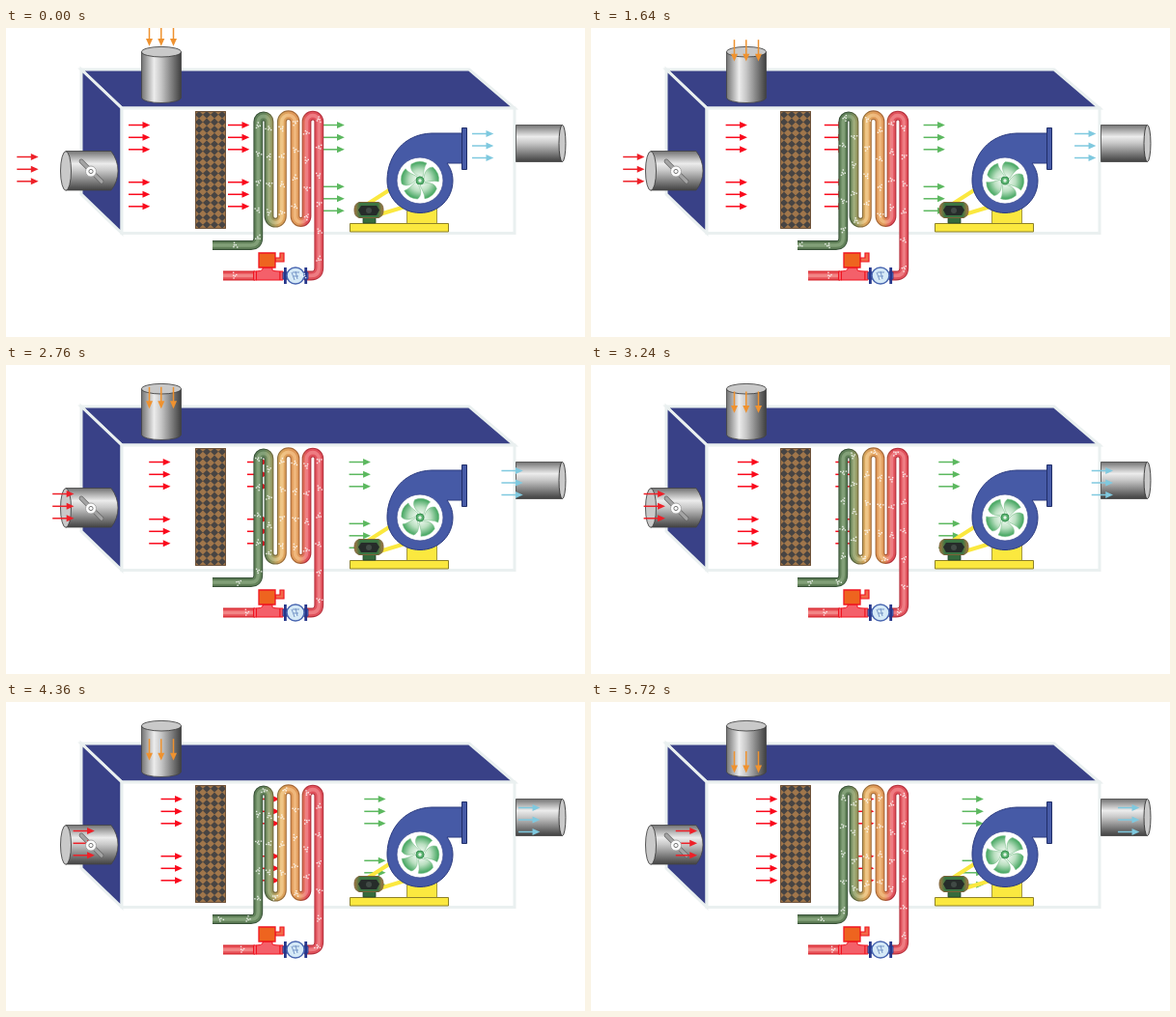
These frames come from a looping animation (600 by 320 pixels, 5760 ms). An HTML page with a canvas:

```html
<!DOCTYPE html>
<html lang="en">
<head>
<meta charset="utf-8">
<title>Air handling unit</title>
<style>
html, body { margin: 0; width: 100%; height: 100%; overflow: hidden; background: #fff; }
canvas { display: block; width: 600px; height: 320px; }
</style>
</head>
<body>
<canvas id="stage" width="600" height="320"></canvas>
<script>
const ctx = document.getElementById('stage').getContext('2d');
const LOOP = 5760, STEP = 40;
const TAU = Math.PI * 2;

const coilShape = 'M214 225H254Q261.3 225 261.3 217V97a5.6 5.6 0 0 1 11.2 0V195' +
  'a6.7 6.7 0 0 0 13.4 0V97a6.8 6.8 0 0 1 13.6 0V195a6 6 0 0 0 12 0V97' +
  'a6.4 6.4 0 0 1 12.8 0V248Q324.3 256.5 316 256.5H309';
const coil = new Path2D(coilShape);
const inlet = new Path2D('M225 256.5H258');

// Points along the flow, sampled once from the pipe outline
const guide = document.createElementNS('http://www.w3.org/2000/svg', 'path');
guide.setAttribute('d', coilShape);
const coilLength = guide.getTotalLength();
const flow = [];
for (let s = 0; s <= coilLength; s++) flow.push(guide.getPointAtLength(coilLength - s));

function paint(path, fill, stroke, width = 1) {
  if (fill) { ctx.fillStyle = fill; ctx.fill(path); }
  if (stroke) { ctx.strokeStyle = stroke; ctx.lineWidth = width; ctx.stroke(path); }
}

function shape(d, fill, stroke, width) {
  paint(new Path2D(d), fill, stroke, width);
}

function box(x, y, w, h, fill, stroke, width) {
  const p = new Path2D();
  p.rect(x, y, w, h);
  paint(p, fill, stroke, width);
}

function oval(x, y, rx, ry, fill, stroke, width) {
  const p = new Path2D();
  p.ellipse(x, y, rx, ry, 0, 0, TAU);
  paint(p, fill, stroke, width);
}

function ramp(x0, y0, x1, y1, ...stops) {
  const g = ctx.createLinearGradient(x0, y0, x1, y1);
  stops.forEach(([at, color]) => g.addColorStop(at, color));
  return g;
}

const metal = (x0, y0, x1, y1) =>
  ramp(x0, y0, x1, y1, [0, '#6e6e6e'], [0.32, '#ececec'], [0.5, '#c6c6c6'], [1, '#3c3c3c']);

function drawHousing() {
  const edge = '#eaf0f0', blue = '#394187';
  shape('M78 43H480L527 83H120Z', blue, edge, 3);
  shape('M78 43L120 83V212.5L78 172Z', blue, edge, 3);
  box(120, 83, 407, 129.5, '#fff', edge, 3);
}

function drawDucts() {
  const cap = '#c9c9c9';
  shape('M140.5 25V72A20.5 5.5 0 0 0 181.5 72V25Z', metal(140, 0, 182, 0), '#444', 0.8);
  oval(161, 24.7, 20.5, 5.3, cap, '#333', 0.8);

  shape('M62 127.5H109Q116 137 116 148Q116 159 109 168H62Z', metal(0, 127, 0, 169), '#444', 0.8);
  oval(62, 148, 5.5, 20.3, cap, '#333', 0.8);

  box(528.5, 100.5, 48, 38, metal(0, 100, 0, 139), '#444', 0.8);
  oval(576.5, 119.5, 3.5, 19, cap, '#222', 0.8);
}

function drawHandle() {
  ctx.lineCap = 'round';
  const bar = new Path2D('M78 138L99 159');
  paint(bar, null, '#666', 4.6);
  paint(bar, null, '#a4a4a4', 3.2);
  ctx.lineCap = 'butt';
}

function drawKnob() {
  oval(88, 148.5, 5.5, 5.5, '#fbfbfb', '#999', 0.8);
  oval(88, 148.5, 2.1, 2.1, '#fff', '#777', 1);
}

function drawFilter() {
  ctx.save();
  ctx.beginPath();
  ctx.rect(196, 86, 32, 122);
  ctx.clip();
  box(196, 86, 32, 122, '#474443');
  const w = 8, h = 7.6;
  for (let i = 0; i <= 4; i++) {
    for (let j = 0; j <= 17; j++) {
      const x = 196 + i * w, y = 86 + j * h;
      shape(`M${x} ${y - h / 2}l${w / 2} ${h / 2}l${-w / 2} ${h / 2}l${-w / 2} ${-h / 2}Z`, '#a0764b');
    }
  }
  ctx.restore();
  box(196.5, 86.5, 31, 121, null, '#6d523a', 1);
}

function tube(path, dark, main, light) {
  paint(path, null, dark, 9.8);
  paint(path, null, main, 7.6);
  paint(path, null, light, 3.6);
}

function coilTint(green, olive, tan, orange, red) {
  return ramp(261, 0, 325, 0, [0, green], [0.1, green], [0.2, olive], [0.36, tan],
    [0.54, orange], [0.66, orange], [0.79, red], [1, red]);
}

function drawPipes() {
  tube(coil,
    coilTint('#395339', '#5d653d', '#99713c', '#a76735', '#b5303c'),
    coilTint('#62825a', '#88945f', '#dca85f', '#e09a5a', '#e0525c'),
    coilTint('#82a078', '#a3ad7a', '#efc888', '#efb77c', '#ee7c82'));
  tube(inlet, '#d8262e', '#e8545a', '#f28686');
}

function drawValves() {
  const red = '#f01420';
  shape('M266 248H276V251Q278 252 284 252V261H259V252Q265 252 266 250Z', '#f4606a', red, 1);
  box(256.5, 252, 3, 9, '#f4606a', red, 1);
  box(284, 252, 3, 9, '#f4606a', red, 1);
  shape('M279 238H284V233H288V242H279Z', '#f26a4a', red, 1.2);
  box(262, 233, 17, 15, '#ee641f', red, 1.3);

  const navy = '#26378b';
  box(287, 253, 26, 7, '#5c78bd', navy, 0.8);
  box(288, 248, 2.8, 17, navy);
  box(309.3, 248, 2.8, 17, navy);
  oval(300, 256.5, 9, 8.5, '#d6eaf7', '#4967b1', 1.5);
  shape('M296 253L299 261M300 252L302 260M297 253H304M298 257H303', null, '#7696c7', 1);
}

function drawSparkles(t) {
  const gap = 29, shift = t / LOOP * gap * 6;
  ctx.fillStyle = 'rgba(255,255,255,.85)';
  const cluster = (x, y, turn) => {
    for (let i = 0; i < 5; i++) {
      const a = turn + i * 2.4, r = 0.6 + i * 0.7;
      ctx.fillRect(x + Math.cos(a) * r - 0.7, y + Math.sin(a) * r - 0.7, 1.4, 1.4);
    }
  };
  for (let s = shift % gap, i = 0; s < coilLength; s += gap, i++) {
    const p = flow[Math.floor(s)];
    cluster(p.x, p.y, (i - Math.floor(shift / gap)) * 1.7);
  }
  cluster(237 + shift % gap * 0.5, 256.5, 1);
}

function drawFan(t) {
  const line = '#8d8128', yellow = '#fbe83f';
  shape('M375 182L400 166M384 194L417 184', null, yellow, 4);
  box(415.5, 184, 31, 19, yellow, line, 0.8);
  box(356.5, 202.5, 102, 8.5, yellow, line, 1);

  box(370, 194, 13, 8, '#366b3d', '#24432a', 0.8);
  shape('M366 180.5H386Q391 182 391 188.5Q391 195 386 196.5H366Q361 195 361 188.5Q361 182 366 180.5Z',
    ramp(361, 0, 391, 0, [0, '#a97943'], [0.2, '#3b7442'], [0.8, '#3b7442'], [1, '#a97943']), '#7a6238', 1);
  shape('M368 184H384L387 188.5L384 194H368L365 188.5Z', '#262c2a');
  oval(376, 189, 3, 3, '#414a46');

  shape('M473 109H441C412 110 396 132 395 156C394 176 410 191.5 429 191.5' +
    'C448 191.5 463 177 463 158C463 150 460 144 457 140H473Z', '#465aa6', '#2c3c80', 1);
  box(472.5, 103.5, 5, 43, '#465aa6', '#202e69', 1);
  oval(429, 158, 24, 24, '#fff', '#3b4c93', 0.8);

  const leaf = ctx.createRadialGradient(0, 0, 3, 0, 0, 21);
  leaf.addColorStop(0, '#f2faf3');
  leaf.addColorStop(0.45, '#b9dfc0');
  leaf.addColorStop(1, '#2c9a4c');
  ctx.save();
  ctx.translate(429, 158);
  ctx.rotate(t / LOOP * TAU * 8);
  for (let i = 0; i < 5; i++) {
    shape('M1 -4C-7 -6 -11 -12 -9 -17Q-1 -22 7 -18C4 -14 4 -9 3 -4Z', leaf, '#74bd84', 0.5);
    ctx.rotate(TAU / 5);
  }
  ctx.restore();
  oval(429, 158, 4, 4, '#5cb572', '#2b8344', 0.8);
  oval(429, 158, 1.7, 1.7, '#e2f3e5');
}

function arrow(x, y, color, angle = 0) {
  ctx.save();
  ctx.translate(x, y);
  ctx.rotate(angle);
  box(0, -0.75, 16, 1.5, color);
  shape('M14.5 -3.5L22.3 0L14.5 3.5Z', color);
  ctx.restore();
}

function arrows(x, rows, color) {
  rows.forEach(y => arrow(x, y, color));
}

function draw(t) {
  const k = t / LOOP;
  const upper = [100.5, 113.3, 125.8], lower = [159.7, 172.3, 184.8];
  ctx.fillStyle = '#fff';
  ctx.fillRect(0, 0, 600, 320);

  drawHousing();
  drawDucts();
  drawHandle();
  arrows(11.3 + 77 * k, [133.5, 146.3, 158.8], '#ee2028');
  drawKnob();
  [148.5, 160.8, 173.5].forEach(x => arrow(x, -3.5 + 55 * k, '#ef922f', Math.PI / 2));

  drawFilter();
  arrows(127 + 44.3 * k, [...upper, ...lower], '#fa0a1c');
  arrows(230 + 41.5 * k, [...upper, ...lower], '#fa0a1c');
  arrows(328.5 + 56.5 * k, [...upper, 164.3, 176.8, 189.3], '#5cb85f');
  drawPipes();
  drawValves();
  drawSparkles(t);
  drawFan(t);
  arrows(483 + 63.5 * k, [109.5, 122, 134.5], '#7fc9df');
}

const start = performance.now();
function tick() {
  const t = (performance.now() - start) % LOOP;
  draw(Math.floor(t / STEP) * STEP);
  requestAnimationFrame(tick);
}
tick();
</script>
</body>
</html>
```
